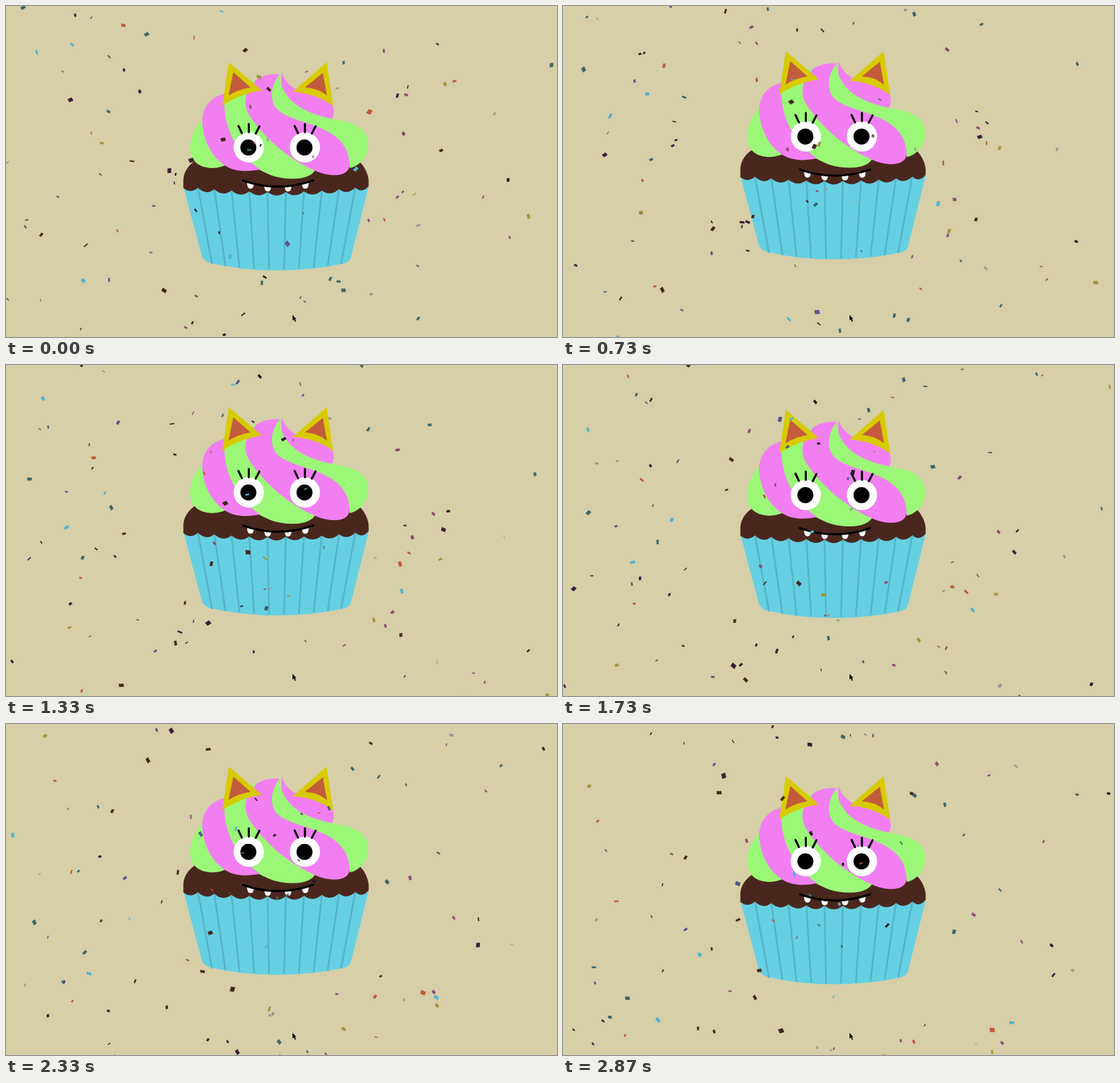
Recreate the animation shown at these times as an HTML page. Size 800 by 480 pixels, loop 2.94 s.

```html
<!DOCTYPE html>
<html lang="en">
<head>
<meta charset="utf-8">
<title>Cupcake and confetti</title>
<style>
  html, body { margin: 0; width: 100%; height: 100%; overflow: hidden; background: #d7cfa8; }
  svg { display: block; width: 800px; height: 480px; }
</style>
</head>
<body>
<svg viewBox="0 0 800 480" xmlns="http://www.w3.org/2000/svg">
  <rect width="800" height="480" fill="#d7cfa8"/>
  <g id="cupcake">
    <path fill="#66d0e3" d="M257.500 262L284.500 363Q287 369 294 372Q340 383.500 393 383.500Q446 383.500 492 373Q500 370 501 364L526.500 262Z"/>
    <g id="pleats" stroke="#56b5c7" stroke-width="2.600"/>
    <path id="cake" fill="#4a271d"/>
    <g fill="#9bf777">
      <path d="M289 160C273 176 266 192 267.500 210C269 226 282 235 300 235Q312 235 325 228Z"/>
      <path d="M316 130L362 106L400 180L449 238C444 246 434 250 418 250.500C396 251 382 245 367 237L320 205Z"/>
    </g>
    <g fill="#f17ff2">
      <path d="M318 127C296 132 284 148 285 170C287 203 306 229 330 237C345 241 359 239 369 237C342 219 317 185 317 140Z"/>
      <path d="M397 99C381 98 370 102 362 108L350 127C344 142 350 156 360 168C379 194 412 223 447 238C463 246 480 247 490 243C499 239 500 231 499 222L508 205L470 168L400 150Z"/>
      <path d="M400 96C404 108 412 117 424 122L470 137C476 145 477 153 475 160Q473 165 468 165L400 140Z"/>
    </g>
    <path fill="#9bf777" d="M398 97C387 113 382 129 390 145C402 164 440 167 465 181C489 193 500 212 499 235C516 231 526 217 526 201C526 182 511 171 490 167C435 157 402 142 396 99Z"/>
    <g fill="#d8cb00">
      <path d="M323.500 81.500L371.500 122.500Q340 127 314 144.500Z"/>
      <path d="M465.500 81.500L475 145Q451 127 416.500 124.500Z"/>
    </g>
    <g fill="#c35c3d">
      <path d="M330 96L355 118Q337 121 323 130Z"/>
      <path d="M460 97L466 130Q453 119 434 118Z"/>
    </g>
    <g id="eyes"></g>
    <g id="teeth" fill="#fff"></g>
    <path d="M344 253Q394 271 446 253" fill="none" stroke="#000" stroke-width="3" stroke-linecap="round"/>
  </g>
  <g id="confetti"></g>
  <path d="M416 448v8l2-1.500 1.500 3.500 1.500-.8-1.500-3.400h2z" fill="#000"/>
</svg>
<script>
const LOOP = 2940, FPS = 15, LAST_STEP = 43;
const BOB_HEIGHT = 28, BOB_PERIOD = 1.007;
const PIECES = 98, FALL_SPAN = 500;
const COLORS = ["#3e6769", "#8f4b73", "#43291c", "#251b1e", "#3e6769", "#3b2139",
  "#c0593a", "#3e6769", "#43291c", "#a3943c", "#3b2139", "#8f4b73", "#555987",
  "#9b9892", "#4db4d0"];

const $ = id => document.getElementById(id);

function add(parent, tag, attrs) {
  const node = document.createElementNS("http://www.w3.org/2000/svg", tag);
  for (const key in attrs) node.setAttribute(key, attrs[key]);
  return parent.appendChild(node);
}

function random(seed) {
  return () => {
    seed = (seed + 0x6D2B79F5) | 0;
    let n = Math.imul(seed ^ (seed >>> 15), 1 | seed);
    n = (n + Math.imul(n ^ (n >>> 7), 61 | n)) ^ n;
    return ((n ^ (n >>> 14)) >>> 0) / 4294967296;
  };
}

function buildCake() {
  const edge = x => 269.5 - 6 * ((x - 392) / 113) ** 2;
  let outline = "M257.5 264";
  let left = 257.5;
  const scallopTo = x => {
    outline += `Q${(left + x) / 2} ${edge((left + x) / 2) + 10.5} ${x} ${edge(x)}`;
    left = x;
  };
  // Pleats start between scallops, closer together towards the rim.
  for (let u = -4.5; u < 5; u++) {
    const x = 393 + 26.6 * u - 0.06 * u ** 3;
    const bottom = 392 + (x - 392) * 0.82;
    scallopTo(x);
    add($("pleats"), "line", {
      x1: x, y1: edge(x), x2: bottom, y2: 382 - 8 * ((bottom - 392) / 95) ** 2
    });
  }
  scallopTo(526.5);
  $("cake").setAttribute("d", outline + "V252C525 240 519 230 510 223H277C266 229 258 240 257.5 252Z");
}

function buildFace() {
  for (const x of [352.5, 434]) {
    add($("eyes"), "circle", { cx: x, cy: 205, r: 22, fill: "#fff" });
    add($("eyes"), "circle", { cx: x - 0.6, cy: 205.2, r: 11.6, fill: "#000" });
    add($("eyes"), "path", {
      d: `M${x - 15} 174l5 10.5M${x} 171v12M${x + 15.5} 174.5l-5.5 10.5`,
      stroke: "#000", "stroke-width": 3, "stroke-linecap": "round"
    });
  }
  for (const [x, y] of [[355, 256], [380, 260], [409.5, 260], [434.5, 256]])
    add($("teeth"), "path", { d: `M${x - 5} ${y}q0 9 5 9t5-9z` });
}

function makePiece(rnd, i) {
  const size = 3.8 + 3.4 * rnd() ** 1.5;
  const w = size / 2, h = size * (0.38 + 0.16 * rnd());
  return {
    x: rnd() * 800, y: rnd() * FALL_SPAN,
    vx: (rnd() - 0.5) * 110, vy: 65 + rnd() * 75,
    angle: rnd() * 360, spin: (rnd() - 0.5) * 260,
    flip: rnd() * 2 * Math.PI, flipRate: 2 + rnd() * 5,
    node: add($("confetti"), "path", {
      fill: COLORS[i % COLORS.length],
      d: `M${-w} ${-h}L${w} ${1 - h}L${w} ${h}L${-w} ${h - 1}Z`
    })
  };
}

function draw(t) {
  const bob = -BOB_HEIGHT * (1 - Math.cos(2 * Math.PI * t / BOB_PERIOD)) / 2;
  $("cupcake").setAttribute("transform", `translate(0 ${bob.toFixed(2)})`);
  for (const p of pieces) {
    const x = p.x + p.vx * t;
    const y = (p.y + p.vy * t) % FALL_SPAN - 10;
    const width = 0.3 + 0.7 * Math.abs(Math.cos(p.flip + p.flipRate * t));
    p.node.setAttribute("transform",
      `translate(${x.toFixed(2)} ${y.toFixed(2)}) rotate(${(p.angle + p.spin * t).toFixed(1)}) scale(1 ${width.toFixed(3)})`);
  }
}

buildCake();
buildFace();
const rnd = random(73);
const pieces = Array.from({ length: PIECES }, (_, i) => makePiece(rnd, i));
draw(0);

let start;
function tick(now) {
  start ??= now;
  const ms = (now - start) % LOOP;
  draw(Math.min(LAST_STEP, Math.floor((ms + 5) * FPS / 1000)) / FPS);
  requestAnimationFrame(tick);
}
requestAnimationFrame(tick);
</script>
</body>
</html>
```
